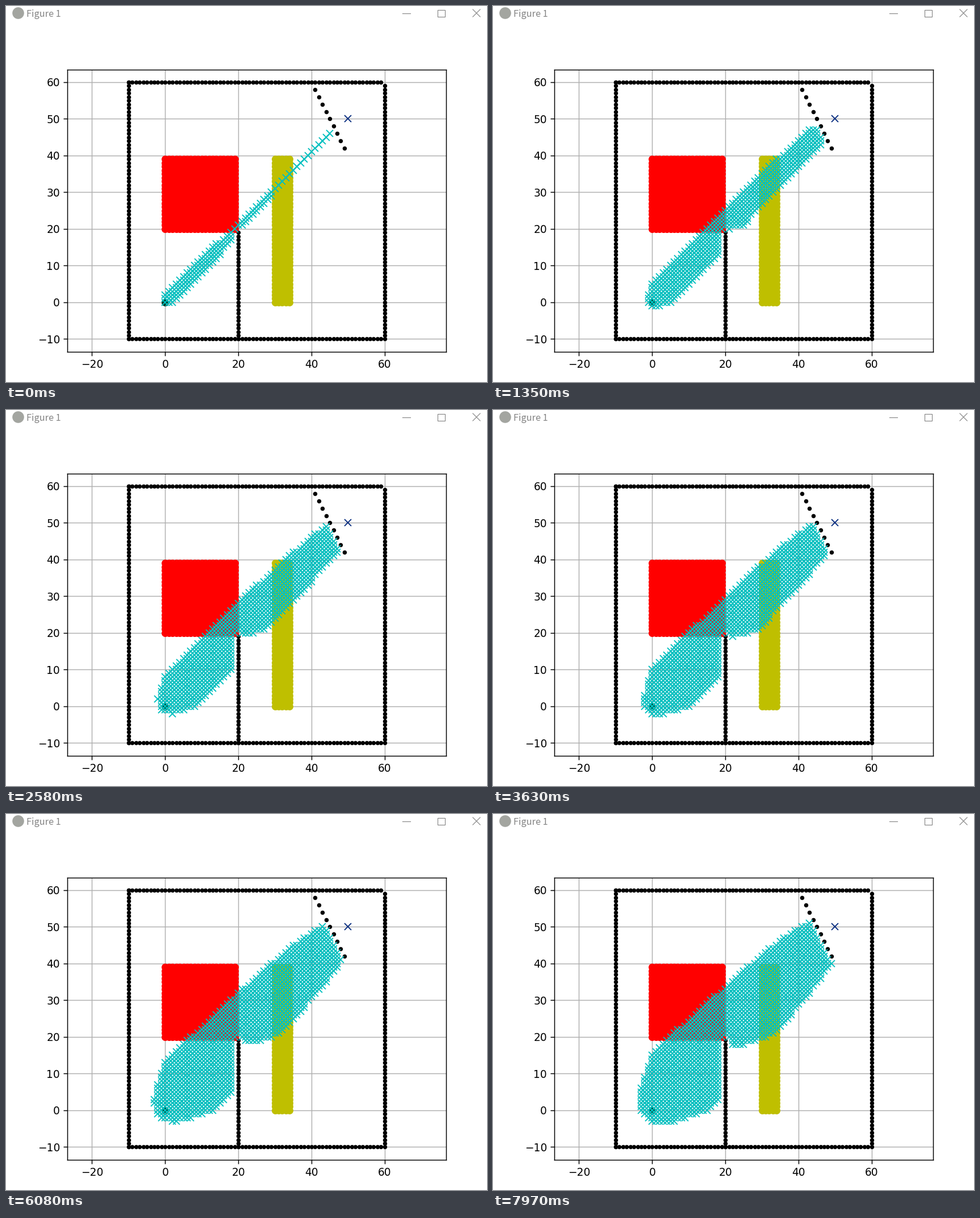
A matplotlib script that plays this animation: 847 px wide and 661 px high, repeating every 8 s.

```python
from math import hypot

import matplotlib.pyplot as plt
import numpy as np
from matplotlib.animation import FuncAnimation
from matplotlib.patches import Circle, Rectangle

W, H, DPI = 847, 661, 128
SCALE = 1.05
LOOP_MS, INTERVAL = 8000, 20

START, GOAL = (0, 0), (50, 50)
ZONE_TOLL = 0.2 / 21
MOVES = [(1, 0), (0, 1), (-1, 0), (0, -1),
         (-1, -1), (-1, 1), (1, -1), (1, 1)]

# Bursts of redraws: first time, last time, number of redraws
BURSTS = [(70, 600, 9), (750, 1350, 10), (1410, 1550, 3), (1620, 2380, 12),
          (2440, 2580, 3), (2650, 3230, 8), (3360, 3630, 4), (3760, 4090, 4),
          (4220, 4420, 3), (4570, 5350, 7), (5480, 5810, 4), (5950, 6080, 2),
          (6210, 6730, 5), (6860, 7380, 5), (7580, 7970, 4)]

# Path-cost estimate the search has reached at a given time
REACHED = [(0, 71.3167), (1350, 72.594), (2580, 73.60), (3630, 74.19),
           (4420, 74.57), (6080, 75.37), (7970, 76.31)]


def block(xs, ys):
    return [(x, y) for x in xs for y in ys]


side = range(-10, 60)
obstacles = (block(side, [-10]) + block([60], side) + block(side, [60])
             + block([-10], range(-10, 61)) + block([20], range(-10, 20))
             + [(41 + i, 58 - 2 * i) for i in range(9)])
red_zone = block(range(20), range(20, 40))
yellow_zone = block(range(30, 35), range(40))


def explore(count):
    """A* expansion order and the cost estimate of each expanded cell."""
    blocked = {(x + dx, y + dy) for x, y in obstacles
               for dx, dy in MOVES[:4] + [(0, 0)]}
    tolled = set(red_zone + yellow_zone)
    cost, frontier = {START: 0.0}, {START: hypot(*GOAL)}
    closed, order, totals = set(), [], []
    while frontier and len(order) < count:
        cell = min(frontier, key=frontier.get)
        totals.append(frontier.pop(cell))
        order.append(cell)
        closed.add(cell)
        for dx, dy in MOVES:
            new = cell[0] + dx, cell[1] + dy
            if new in blocked or new in closed:
                continue
            rate = 1 + ZONE_TOLL * (new in tolled)
            new_cost = cost[cell] + hypot(dx, dy) * rate
            if new not in frontier or new_cost < cost[new]:
                cost[new] = new_cost
                frontier[new] = new_cost + hypot(GOAL[0] - new[0],
                                                 GOAL[1] - new[1])
    return np.array(order), np.maximum.accumulate(totals)


order, totals = explore(1400)
step_times = np.concatenate([np.linspace(*burst) for burst in BURSTS])


def steps_at(t):
    return np.searchsorted(step_times, t + 1e-6)


anchor_times, anchor_costs = np.array(REACHED).T
anchor_steps = steps_at(anchor_times)
anchor_counts = np.searchsorted(totals, anchor_costs)


def visible_count(t):
    """The plot refreshes after every tenth expanded cell."""
    count = np.interp(steps_at(t), anchor_steps, anchor_counts)
    return 10 * int(round((count - 1) / 10)) + 1


plt.rcParams.update({
    "font.family": "DejaVu Sans", "font.size": 10 * SCALE,
    "toolbar": "None",
    "axes.linewidth": 0.8 * SCALE, "grid.linewidth": 0.8 * SCALE,
    "lines.markersize": 6 * SCALE, "lines.markeredgewidth": SCALE,
})
for axis in "xtick", "ytick":
    plt.rcParams.update({f"{axis}.major.size": 3.5 * SCALE,
                         f"{axis}.major.pad": 3.5 * SCALE,
                         f"{axis}.major.width": 0.8 * SCALE})

fig = plt.figure(figsize=(W / DPI, H / DPI), dpi=DPI, facecolor="white")

# Window title bar, in pixels
bar = fig.add_axes([0, 0, 1, 1])
bar.set(xlim=(0, W), ylim=(H, 0))
bar.axis("off")
GREY = "#858585"
bar.add_patch(Circle((21.5, 12.5), 10.3, fc="#a3a5a0", ec="none"))
bar.text(36, 18.7, "Figure 1", family="Noto Sans CJK JP", size=9.2,
         color=GREY, va="baseline")
thin = dict(color=GREY, lw=0.65)
bar.plot([698, 712], [12.5, 12.5], **thin)
bar.add_patch(Rectangle((760, 6.5), 12.5, 12.5, fill=False, ec=GREY, lw=0.65))
bar.plot([822, 835], [6, 19], **thin)
bar.plot([822, 835], [19, 6], **thin)

# Map
left, right, top, bottom = 108, 775, 112, 607.7
ax = fig.add_axes([left / W, 1 - bottom / H,
                   (right - left) / W, (bottom - top) / H])
ax.patch.set_alpha(0)
ax.set(xlim=(-26.75, 76.8), ylim=(-13.45, 63.4),
       xticks=range(-20, 61, 20), yticks=range(-10, 61, 10))
ax.grid(True)


def draw_cells(cells, style, **kw):
    return ax.plot(*np.array(cells).T, style, **kw)[0]


draw_cells(obstacles, ".k")
draw_cells([START], "o", color="#003c28")
draw_cells([GOAL], "x", color="#0a2f80")
draw_cells(yellow_zone, "oy")
draw_cells(red_zone, "or")
explored = draw_cells(order[:1], "xc")


def update(frame):
    count = visible_count((frame + 0.5) * INTERVAL)
    explored.set_data(*order[:count].T)
    return explored,


anim = FuncAnimation(fig, update, frames=LOOP_MS // INTERVAL,
                     interval=INTERVAL, repeat=True, repeat_delay=0)
plt.show()
```
